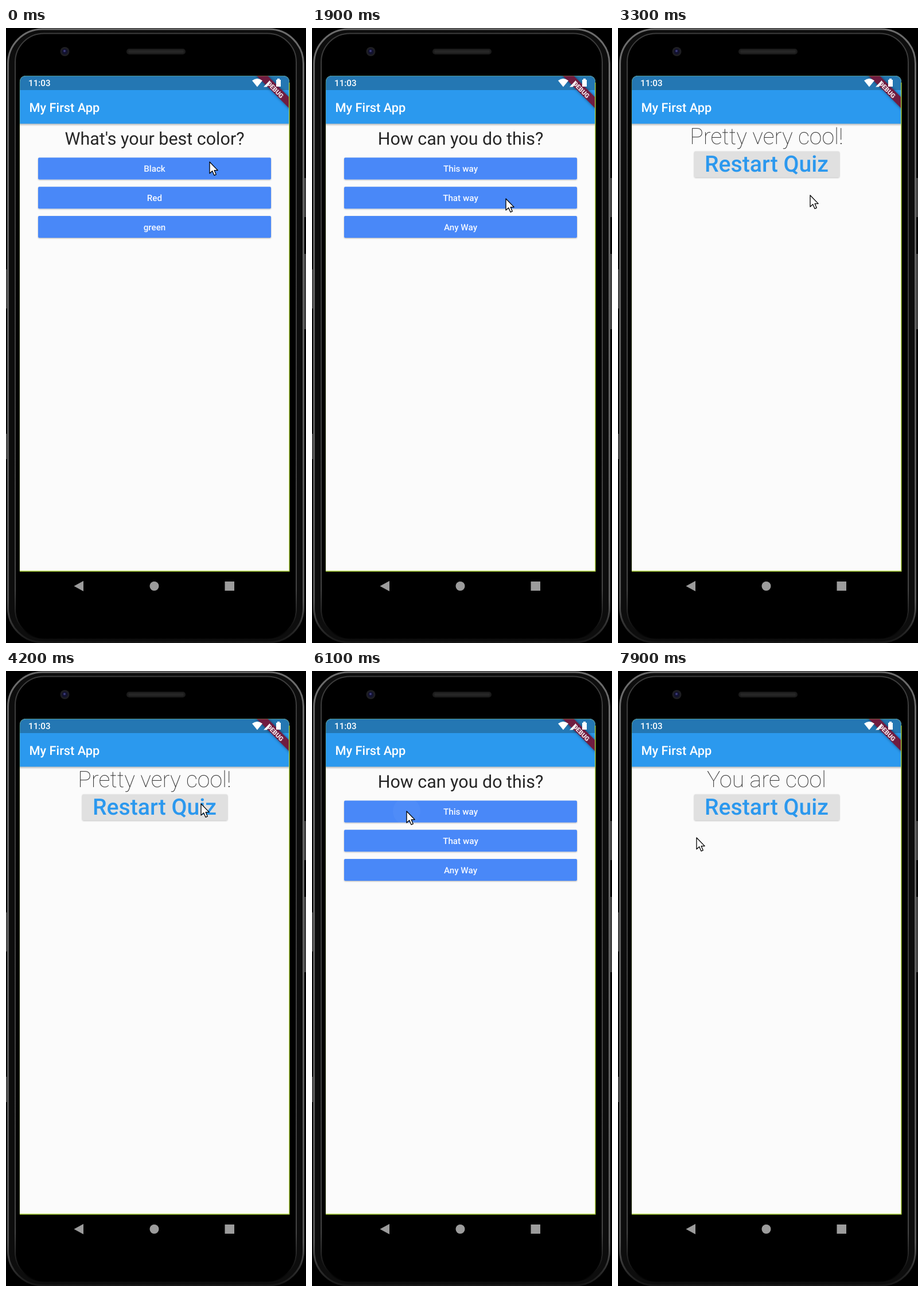
An HTML page for the animation above (8 s loop, 523 px wide and 1070 px high).

```html
<!DOCTYPE html>
<html lang="en">
<head>
<meta charset="utf-8">
<title>Quiz on a phone</title>
<style>
  html, body { margin: 0; width: 100%; height: 100%; overflow: hidden; background: #000; }
  svg { display: block; width: 100%; height: 100%; font-family: Roboto, sans-serif; text-rendering: geometricPrecision; }
  .answer { font-size: 15.23px; font-weight: 500; fill: #f4f8ff; }
  .question { font-size: 30.46px; fill: #262626; }
  .result { font-size: 39.2px; font-weight: 100; fill: #303030; }
  .restart { font-size: 39.2px; font-weight: 500; fill: #2b98ee; }
  .middle { text-anchor: middle; }
</style>
</head>
<body>
<svg viewBox="0 0 523 1070">
  <defs>
    <linearGradient id="rim" x1="0" x2="0" y1="0" y2="1">
      <stop offset="0" stop-color="#6c6c6c"/><stop offset=".93" stop-color="#565656"/><stop offset="1" stop-color="#161616"/>
    </linearGradient>
    <linearGradient id="innerRim" x1="0" x2="0" y1="0" y2="1">
      <stop offset="0" stop-color="#3c3c3c"/><stop offset=".92" stop-color="#444"/><stop offset="1" stop-color="#000"/>
    </linearGradient>
    <linearGradient id="barShadow" x1="0" x2="0" y1="0" y2="1">
      <stop offset="0" stop-opacity=".28"/><stop offset="1" stop-opacity="0"/>
    </linearGradient>
    <filter id="lift" x="-5%" y="-20%" width="110%" height="150%">
      <feDropShadow dx="0" dy="1" stdDeviation="1" flood-opacity=".3"/>
    </filter>
    <filter id="glow" x="-30%" y="-30%" width="160%" height="160%">
      <feDropShadow dx="0" dy="0" stdDeviation="2.5" flood-opacity=".5"/>
    </filter>
    <clipPath id="screenClip"><path d="M24 945V95Q24 83 36 83H482Q494 83 494 95V945Z"/></clipPath>
    <clipPath id="answerClip"><path d="M56 225H462V264H56ZM56 276H462V314H56ZM56 327H462V365H56Z"/></clipPath>
  </defs>

  <!-- phone body -->
  <rect width="523" height="1070"/>
  <path d="M.5 420V488M.5 706V750M521.500 261V329M521.500 393V524" stroke="#5c5c5c" stroke-width="2"/>
  <rect x="3.500" y="2" width="515" height="1067" rx="60" fill="#0d0d0d" stroke="url(#rim)" stroke-width="3"/>
  <rect x="16" y="9.500" width="490" height="1052" rx="50" fill="#000" stroke="url(#innerRim)" stroke-width="2"/>
  <rect x="210" y="36" width="103" height="10" rx="5" fill="#1b1b1b"/>
  <rect x="213" y="38.500" width="97" height="5" rx="2.500" fill="#262626"/>
  <circle cx="102.500" cy="41" r="8" fill="#1e1e22"/>
  <circle cx="102.500" cy="41" r="5" fill="#12122e"/>
  <circle cx="102" cy="40" r="2" fill="#3b3a78"/>
  <g fill="#9c9c9c">
    <path d="M118.500 971L135 962V980Z"/>
    <circle cx="258.500" cy="971" r="8"/>
    <rect x="381.500" y="963" width="16.500" height="16"/>
  </g>

  <!-- app screen -->
  <g clip-path="url(#screenClip)">
    <rect x="24" y="83" width="470" height="862" fill="#fbfbfb"/>
    <rect x="24" y="166" width="470" height="5" fill="url(#barShadow)"/>
    <rect x="24" y="83" width="470" height="83.500" fill="#2b99ee"/>
    <rect x="24" y="83" width="470" height="25" fill="#2477b3"/>
    <text x="39" y="101" font-size="15.200" font-weight="500" fill="#fff">11:03</text>
    <text x="40.500" y="146" font-size="21.800" font-weight="500" fill="#fff">My First App</text>
    <g id="page"></g>
    <circle id="ripple" fill="#fff" clip-path="url(#answerClip)"/>
    <path d="M429 75L502 148V129L448 75Z" fill="#701b40" filter="url(#glow)"/>
    <g fill="#fff">
      <path d="M429 91.500Q438 84.500 447 91.500L438 102.500Z"/>
      <path d="M449 102.500L460 91V97L454.500 102.500Z"/>
      <path d="M471 90H473V88H477V90H479V102H471Z"/>
    </g>
    <text class="middle" transform="translate(469.500 107.500) rotate(45)" y="4" font-size="11.100" font-weight="900" fill="#f3e6ea">DEBUG</text>
  </g>
  <path d="M24 945V95Q24 83.500 36 83.500H482Q493.800 83.500 493.800 95V945Z" fill="none" stroke="#a4c94a" stroke-opacity=".35"/>
  <path d="M493.800 95V945H24" fill="none" stroke="#b2d941" stroke-width="1.300"/>

  <path id="cursor" d="M0 0V20L4.700 15.800L8 23.300L11.300 21.900L8.100 14.600H14.200Z" fill="#fff" stroke="#000" stroke-width="1.300" stroke-linejoin="round"/>
</svg>

<script>
const LOOP = 8000, STEP = 100;
const page = document.getElementById('page');
const ripple = document.getElementById('ripple');
const cursor = document.getElementById('cursor');

const label = (cls, y, text) => `<text class="${cls} middle" x="259" y="${y}">${text}</text>`;

const quiz = (question, answers) => label('question', 203, question) +
  answers.map((answer, i) => {
    const y = 225.5 + i * 50.8;
    return `<rect x="56" y="${y}" width="406" height="38" rx="2" fill="#4988f8" filter="url(#lift)"/>` +
      label('answer', y + 24.5, answer);
  }).join('');

const result = text => label('result', 202, text) +
  '<rect x="133" y="214.500" width="253" height="45" rx="2" fill="#e0e0e0" filter="url(#lift)"/>' +
  label('restart', 250, 'Restart Quiz');

const colors = quiz("What's your best color?", ['Black', 'Red', 'green']);
const ways = quiz('How can you do this?', ['This way', 'That way', 'Any Way']);

const screens = [
  [0, colors], [500, ways], [3200, result('Pretty very cool!')],
  [4600, colors], [6000, ways], [7400, result('You are cool')]
];

// time, x, y of the pointer tip
const pointer = [
  [0, 355, 233], [900, 355, 233], [1700, 338, 297], [2400, 338, 297],
  [2900, 335, 291], [3300, 335, 291], [3900, 340, 231], [4500, 340, 231],
  [5000, 340, 235], [5300, 340, 235], [5800, 165, 244], [6200, 165, 244],
  [6700, 152, 290], [7000, 152, 290], [7300, 137, 290], [LOOP, 137, 290]
];

// time, x, y of each press on an answer
const presses = [[300, 355, 233], [2900, 333, 290], [5800, 165, 244], [7200, 142, 290]];

function pointerAt(t) {
  const i = pointer.findIndex(key => key[0] > t);
  const [t0, x0, y0] = pointer[i - 1], [t1, x1, y1] = pointer[i];
  const p = (t - t0) / (t1 - t0), e = p * p * (3 - 2 * p);
  return [x0 + (x1 - x0) * e, y0 + (y1 - y0) * e];
}

let shown;
function draw(t) {
  const screen = screens.findLast(s => s[0] <= t)[1];
  if (screen !== shown) page.innerHTML = shown = screen;

  cursor.setAttribute('transform', `translate(${pointerAt(t)})`);

  const press = presses.find(([start]) => t >= start && t < start + 400);
  const visible = press && (screen === colors || screen === ways);
  ripple.setAttribute('opacity', visible ? 0.12 * (1 - (t - press[0]) / 400) : 0);
  if (visible) {
    ripple.setAttribute('cx', press[1]);
    ripple.setAttribute('cy', press[2]);
    ripple.setAttribute('r', 8 * (t - press[0]) / 100);
  }
}

function frame() {
  draw(Math.floor(performance.now() % LOOP / STEP) * STEP);
  requestAnimationFrame(frame);
}
frame();
</script>
</body>
</html>
```
